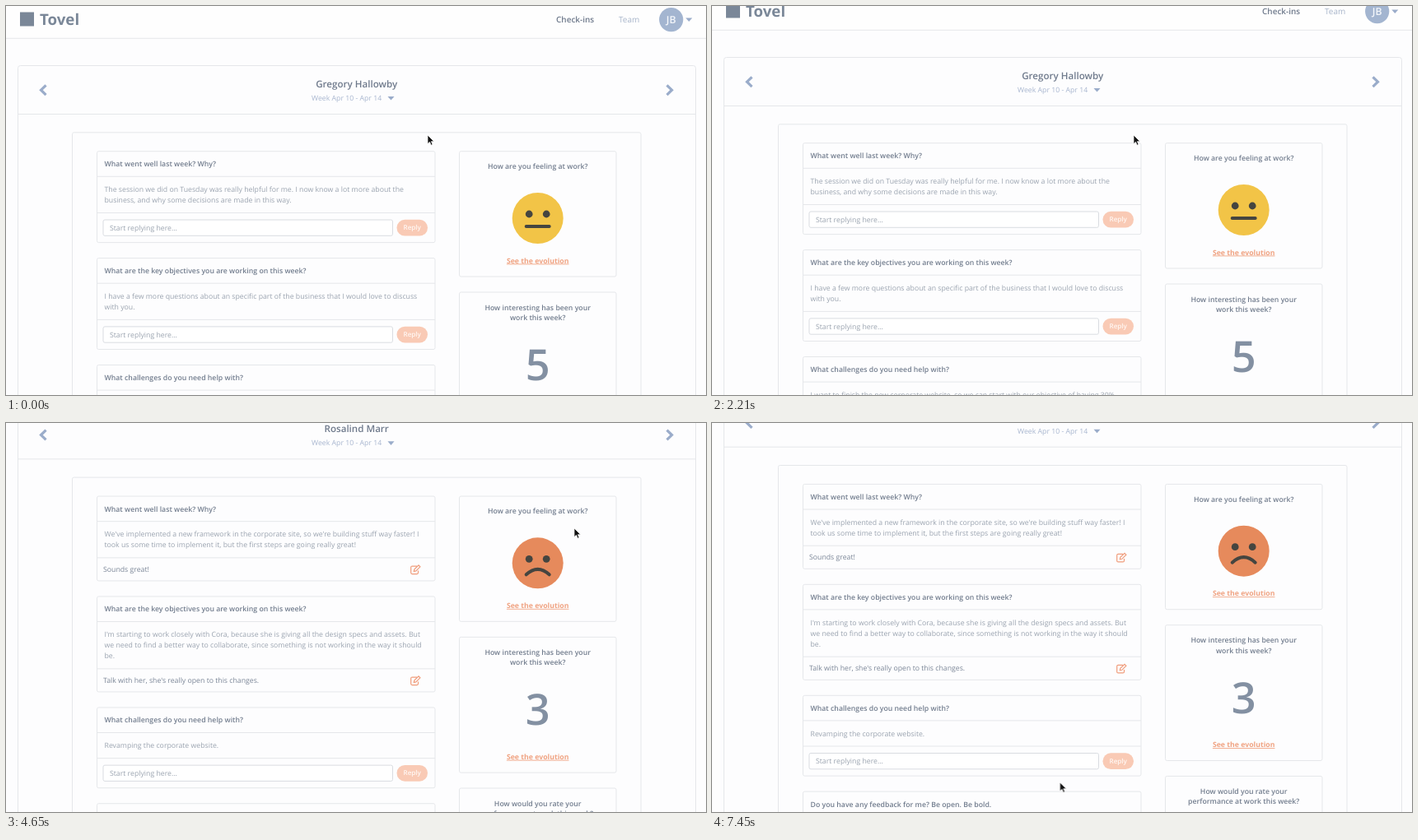
Animation, 850 px wide and 473 px high, one loop 8000 ms. Source, as an HTML page:

```html
<!DOCTYPE html>
<html lang="en">
<head>
<meta charset="utf-8">
<title>Weekly check-in</title>
<style>
html, body { margin: 0; width: 100%; height: 100%; overflow: hidden; background: #fdfdfe; }
svg { display: block; width: 850px; height: 473px; font: 8.72px "Open Sans", sans-serif; text-rendering: geometricPrecision; }
.mid { text-anchor: middle; }
.head { font-weight: 600; fill: #727d8e; }
.body { fill: #9ba4b0; }
.note { fill: #7b8697; }
.link { font-weight: 700; fill: #f0a382; text-decoration: underline; }
.button { font-weight: 600; font-size: 8.1px; fill: #fff7f3; }
.share { font-weight: 600; font-size: 10px; fill: #f5f7fa; }
.score { font-weight: 600; font-size: 52.3px; fill: #8390a2; }
.name { font-weight: 600; font-size: 11.6px; fill: #6f7a8c; }
.week { fill: #a8b6cf; }
.brand { font-weight: 700; font-size: 18.7px; fill: #7a8798; }
.nav { font-size: 9.97px; fill: #a8b5ca; }
.nav.on { font-weight: 600; fill: #6f7a8c; }
.initials { font-weight: 600; font-size: 12.3px; fill: #f3f6fa; }
.big { font-weight: 600; font-size: 14.95px; fill: #6c7788; }
.sub { font-weight: 600; font-size: 9.97px; fill: #b0bccb; }
.axis { font: 9px "Liberation Sans", sans-serif; fill: #777; }
.close { font-weight: 700; fill: #fff; text-decoration: underline; }
.line { fill: none; stroke: #e5e7ea; }
.field { fill: #fff; stroke: #d9dce1; }
.chevron { fill: none; stroke: #9aacca; stroke-width: 3.2; }
.face { fill: none; stroke: #454540; stroke-width: 4; stroke-linecap: round; }
.pen { fill: none; stroke: #f09c7b; stroke-width: 1.2; }

.page, .cursor, .first, .second, .modal, .arrow, .hand, .hot { animation: 8s step-end infinite; }
.page { animation-name: scroll; }
.cursor { animation-name: move; }
.first { animation-name: first; }
.second { animation-name: second; }
.modal { animation-name: modal; }
.arrow { animation-name: arrow; }
.hand { animation-name: hand; }
.hot { animation-name: hover; }

@keyframes scroll {
  0% { transform: translateY(0); animation-timing-function: steps(7); }
  7.625% { transform: translateY(-98.3px); animation-timing-function: steps(2); }
  9.875% { transform: translateY(-133px); animation-timing-function: steps(2); }
  12% { transform: translateY(-160px); }
  12.84% { transform: translateY(-160px); animation-timing-function: steps(4); }
  17% { transform: translateY(-336px); animation-timing-function: steps(2); }
  18.75% { transform: translateY(-341px); animation-timing-function: steps(5); }
  23.125% { transform: translateY(-140px); }
  24.25% { transform: translateY(-95px); animation-timing-function: steps(4); }
  27.625% { transform: translateY(-10px); animation-timing-function: steps(3); }
  30.625% { transform: translateY(6px); }
  44.2% { transform: translateY(6px); animation-timing-function: steps(4); }
  48.375% { transform: translateY(-3px); }
  50% { transform: translateY(-3px); animation-timing-function: steps(2); }
  52.25% { transform: translateY(-14.5px); animation-timing-function: steps(6); }
  59.25%, 100% { transform: translateY(-102.3px); }
}
@keyframes move {
  0% { transform: translate(512px, 157px); }
  30.625% { transform: translate(512px, 157px); animation-timing-function: steps(3); }
  34% { transform: translate(804px, 89px); }
  41.625% { transform: translate(804px, 89px); animation-timing-function: steps(2); }
  43.375% { transform: translate(690px, 128px); }
  60% { transform: translate(690px, 128px); animation-timing-function: steps(3); }
  63% { transform: translate(645px, 207px); }
  70.28% { transform: translate(645px, 207px); animation-timing-function: steps(5); }
  75.125% { transform: translate(497px, 224px); }
  77% { transform: translate(497px, 224px); animation-timing-function: steps(5); }
  81.375% { transform: translate(350px, 370px); }
  85.25% { transform: translate(350px, 370px); animation-timing-function: steps(4); }
  88.25% { transform: translate(618px, 187px); animation-timing-function: steps(3); }
  91.25%, 100% { transform: translate(422.5px, 437px); }
}
@keyframes first { 0% { visibility: visible; } 37.75%, 100% { visibility: hidden; } }
@keyframes second { 0% { opacity: 0; } 37.75% { opacity: .5; } 38.625%, 100% { opacity: 1; } }
@keyframes modal { 0% { visibility: hidden; } 65.75% { visibility: visible; } 93.125%, 100% { visibility: hidden; } }
@keyframes arrow {
  0%, 42.5%, 71.25%, 93.125%, 100% { opacity: 1; }
  35.875%, 63%, 91.25% { opacity: 0; }
}
@keyframes hand {
  0%, 42.5%, 71.25%, 93.125%, 100% { opacity: 0; }
  35.875%, 63%, 91.25% { opacity: 1; }
}
@keyframes hover { 0% { fill: #f0a382; } 63% { fill: #e57f55; } 93.125%, 100% { fill: #f0a382; } }
</style>
</head>
<body>
<svg id="stage" viewBox="0 0 850 473"></svg>
<script>
const text = (x, mid, str, cls, drop = 3.1) => `<text x="${x}" y="${mid + drop}" class="${cls}">${str}</text>`;
const rect = (x, y, w, h, attrs, r = 2) => `<rect x="${x}" y="${y}" width="${w}" height="${h}" rx="${r}" ${attrs}/>`;
const path = (d, attrs) => `<path d="${d}" ${attrs}/>`;
const caret = (x, y) => path(`M${x} ${y}h8l-4 4.6z`, 'fill="#9aacca"');

const mouths = {
  grin: '<path d="M-17 6H17Q13 23 0 23T-17 6Z" fill="#454540"/><path d="M-13 8H13V12H-13Z" fill="#fff"/>',
  smile: path('M-15 7Q0 22 15 7', 'class="face"'),
  flat: path('M-14 10H14', 'class="face"'),
  frown: path('M-14 14Q0 1 14 14', 'class="face"'),
  wail: '<path d="M-13 19Q-11 5 0 5T13 19Z" fill="#454540"/>'
};
const emoji = (x, y, scale, color, mouth) => `<g transform="translate(${x} ${y}) scale(${scale})">
  <circle r="31" fill="${color}"/>
  <circle cx="-10.5" cy="-5" r="4.4" fill="#454540"/><circle cx="10.5" cy="-5" r="4.4" fill="#454540"/>
  ${mouths[mouth]}</g>`;

const pencil = y => `<g class="pen" transform="translate(491 ${y - 6})">
  <path d="M8 2H2.2Q.7 2 .7 3.5V10Q.7 11.5 2.2 11.5H8Q9.5 11.5 9.5 10V7.5"/>
  <path d="M4.3 8.4L4.8 6L10 .9L11.9 2.8L6.8 7.9Z"/></g>`;

// One question card; an answer without a note gets the reply form.
function question(top, { title, lines, note }) {
  const bodyTop = top + 30.6, footTop = bodyTop + 18 + 13.1 * lines.length;
  const height = footTop - top + (note ? 28.1 : 36.1);
  const foot = note
    ? text(118, footTop + 14, note, 'note') + pencil(footTop + 14.2)
    : rect(118, footTop + 8.5, 351.5, 19.3, 'class="field"') +
      text(126, footTop + 18.3, 'Start replying here...', 'body') +
      rect(474.5, footTop + 8.3, 37.5, 19.7, 'fill="#f9cab5"', 9.8) +
      text(493.2, footTop + 18, 'Reply', 'button mid', 2.8);
  const svg = rect(110.5, top, 410.5, height, 'class="line"') +
    path(`M110.5 ${bodyTop}h410.5M110.5 ${footTop}h410.5`, 'class="line"') +
    text(119.5, top + 15.4, title, 'head') +
    lines.map((l, i) => text(119.5, bodyTop + 15.6 + 13.1 * i, l, 'body')).join('') + foot;
  return { svg, next: top + height + 19 };
}

const CENTER = 645.7;
const side = (top, height) => rect(550.5, top, 190.5, height, 'class="line"');
const link = (y, extra = '') => text(CENTER, y, 'See the evolution', 'link mid ' + extra);
const rating = (top, titles, score) => side(top, 164.8) +
  titles.map((l, i) => text(CENTER, top + 18.4 + 12.6 * i, l, 'head mid')).join('') +
  text(CENTER, top + 88.5, score, 'score mid', 18.6) + link(top + 145.3);

const TITLES = [
  'What went well last week? Why?',
  'What are the key objectives you are working on this week?',
  'What challenges do you need help with?',
  'Do you have any feedback for me? Be open. Be bold.'
];

function checkIn({ name, answers, mood, scores, hot }) {
  let top = 176.7, svg = text(425.7, 95, name, 'name mid', 4.1);
  answers.forEach((answer, i) => {
    const card = question(top, { title: TITLES[i], ...answer });
    svg += card.svg;
    top = card.next;
  });
  return svg + side(176.7, 152.3) +
    text(CENTER, 195, 'How are you feeling at work?', 'head mid') +
    emoji(CENTER, 258, 1, ...mood) + link(309.4, hot) +
    rating(348, ['How interesting has been your', 'work this week?'], scores[0]) +
    rating(531.7, ['How would you rate your', 'performance at work this week?'], scores[1]);
}

const first = checkIn({
  name: 'Gregory Hallowby',
  mood: ['#f2c447', 'flat'],
  scores: [5, 6],
  answers: [
    { lines: ['The session we did on Tuesday was really helpful for me. I now know a lot more about the',
              'business, and why some decisions are made in this way.'] },
    { lines: ['I have a few more questions about an specific part of the business that I would love to discuss',
              'with you.'] },
    { lines: ['I want to finish the new corporate website, so we can start with our objective of having 30%',
              'conversion rate by the end of the month.'], note: 'Sounds a great goal to achieve!' },
    { lines: ['not now'] }
  ]
});

const second = checkIn({
  name: 'Rosalind Marr',
  mood: ['#e68a5c', 'frown'],
  scores: [3, 4],
  hot: 'hot',
  answers: [
    { lines: ["We've implemented a new framework in the corporate site, so we're building stuff way faster! I",
              'took us some time to implement it, but the first steps are going really great!'], note: 'Sounds great!' },
    { lines: ["I'm starting to work closely with Cora, because she is giving all the design specs and assets. But",
              'we need to find a better way to collaborate, since something is not working in the way it should',
              'be.'], note: "Talk with her, she's really open to this changes." },
    { lines: ['Revamping the corporate website.'] },
    { lines: ['not now'] }
  ]
});

const frame =
  rect(0, -20, 850, 59, 'fill="#fefefe"', 0) + path('M0 39.3H850', 'class="line"') +
  rect(17, 7.5, 17, 17, 'fill="#7a8798"', 0) +
  text(41, 16, 'Tovel', 'brand', 6.7) +
  text(668, 16.5, 'Check-ins', 'nav on', 3.5) + text(744, 16.5, 'Team', 'nav', 3.5) +
  '<circle cx="807.7" cy="16.6" r="14.6" fill="#a3b5d0"/>' +
  text(807.7, 16.6, 'JB', 'initials mid', 4.4) + caret(825.3, 14.5) +
  rect(14.5, 72.5, 823, 752, 'class="line"', 3) + path('M14.5 131.5H837.5', 'class="line"') +
  rect(80.5, 153.8, 690.5, 643.2, 'class="line"') +
  path('M48.5 96.3L42.5 102.2L48.5 108.1M802.5 96.3L808.5 102.2L802.5 108.1', 'class="chevron"') +
  text(371, 112, 'Week Apr 10 - Apr 14', 'week') + caret(463.5, 110) +
  rect(578.8, 737.2, 134, 30, 'fill="#c3cedf"', 15) +
  text(CENTER, 752, 'Share with employee', 'share mid', 3.6);

const points = [[208, 273.5], [353.5, 370.5], [500, 225.5], [645.7, 322.3]];
const dates = ['15/03 - 21/03', '27/03 - 31/03', '03/04 - 07/04', '10/04 - 14/04'];
const curve = 'M208 273.5C208 273.5 299.8 370.5 353.5 370.5C416.6 360.1 436.9 236 500 225.5C553.7 216.6 645.7 322.3 645.7 322.3';
const moods = [['#5ddc68', 'grin'], ['#bbd85a', 'smile'], ['#f0c24c', 'flat'], ['#e37f56', 'frown'], ['#da555c', 'wail']];

const modal =
  rect(0, 0, 850, 473, 'fill="#000" opacity=".5"', 0) +
  rect(136, 88, 582, 333, 'fill="#f9fbfd" filter="url(#shadow)"', 3) +
  text(426.7, 128, 'How are you feeling at work?', 'big mid', 5.3) +
  text(426.7, 152.5, 'Historical evolution for Rosalind Marr', 'sub mid', 3.5) +
  path('M208 176.8H646M208 225.5H646M208 322.3H646M208 370.5H646M208 176.8V377M353.5 370.5v6.5M500 370.5v6.5M645.7 370.5v6.5', 'fill="none" stroke="#dfe1e4"') +
  path(curve + 'V370.5H208Z', 'fill="#d77f5b" opacity=".5"') +
  path(curve, 'fill="none" stroke="#dc8459" stroke-width="1.4"') +
  points.map(([x, y]) => `<circle cx="${x}" cy="${y}" r="3" fill="#dc7f56"/>`).join('') +
  dates.map((d, i) => text(208 + 146 * i, 382.3, d, 'axis mid', 3.2)).join('') +
  moods.map((m, i) => emoji(194.4, 176.5 + 48.2 * i, .29, ...m)).join('') +
  text(426.5, 440.5, 'Close', 'close mid');

const cursor = `
  <path class="arrow" d="M0 0V10.6L2.5 8.3L4.2 12.2L6 11.4L4.4 7.7H7.7Z" fill="#111" stroke="#fff" stroke-width=".7"/>
  <path class="hand" d="M3 8V2Q3 .8 4 .8T5 2V5.5Q6.8 4.9 7 6Q8.6 5.5 8.8 6.6Q10.2 6.3 10.2 7.8V10L9 13.2H4L1.2 9.5Q.3 8.2 1.2 7.8T3 8.8ZM5.5 9v2.5M7.3 9v2.5" fill="#fff" stroke="#222" stroke-width=".9"/>`;

document.getElementById('stage').innerHTML = `
  <defs><filter id="shadow" x="-10%" y="-10%" width="120%" height="125%">
    <feDropShadow dx="0" dy="3" stdDeviation="4" flood-opacity=".55"/></filter></defs>
  <rect width="850" height="473" fill="#fdfdfe"/>
  <g class="page">${frame}<g class="first">${first}</g><g class="second">${second}</g></g>
  <g class="modal">${modal}</g>
  <g class="cursor">${cursor}</g>`;
</script>
</body>
</html>
```
